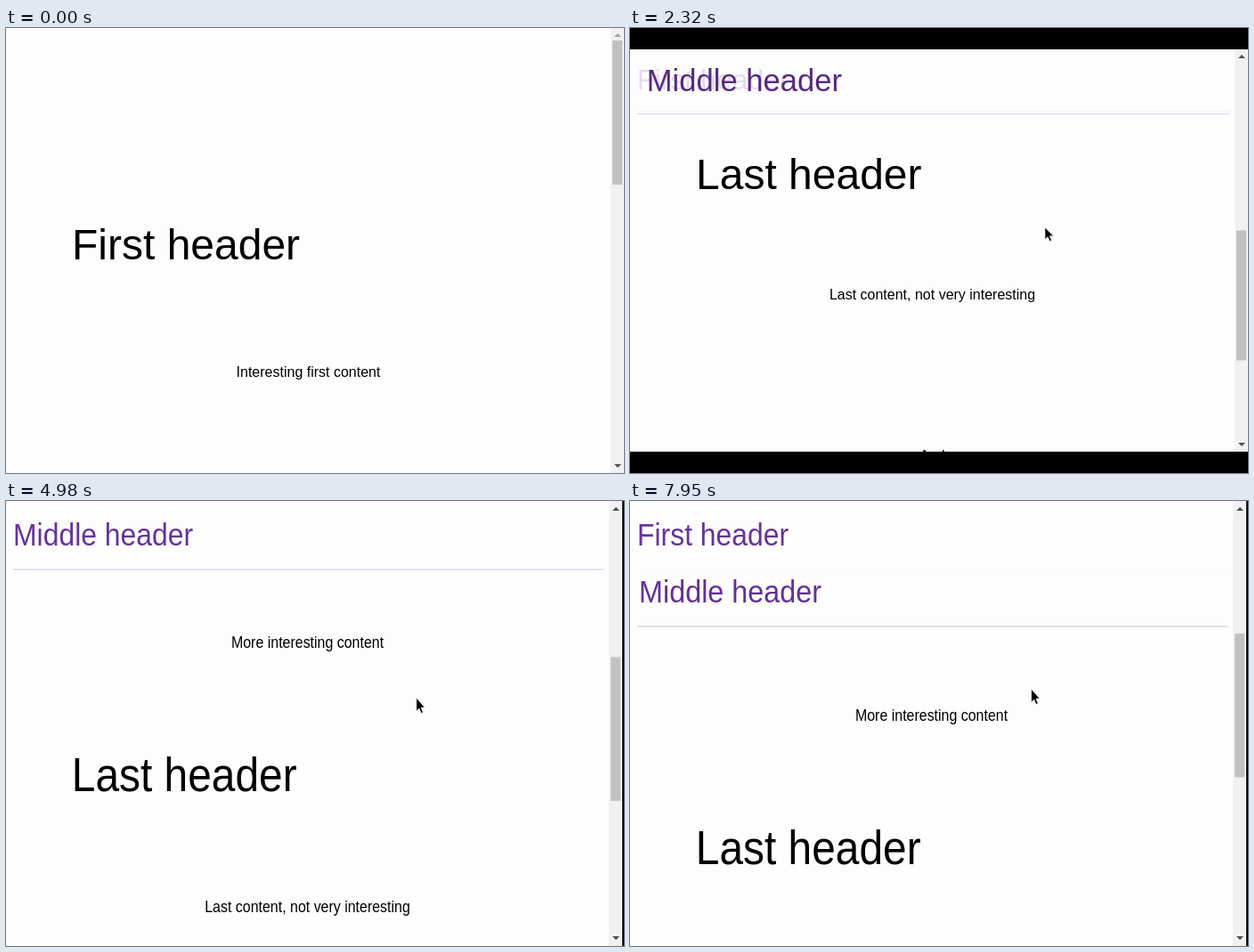
An HTML page that plays this animation: 694 by 500 pixels, repeating every 7990 ms.

```html
<!DOCTYPE html>
<html lang="en">
<head>
<meta charset="utf-8">
<title>Sticky headers</title>
<style>
  html, body { margin: 0; width: 100%; height: 100%; overflow: hidden; background: #000; }
  #page {
    position: absolute; left: 0; width: 694px; overflow: hidden;
    transform-origin: 0 0; background: #fdfdfd; color: #000;
    font-family: "Liberation Sans", Arial, sans-serif;
  }
  #page > * { position: absolute; top: 0; left: 0; white-space: nowrap; }
  #page > .head {
    left: 8px; width: 665px; box-sizing: border-box;
    padding: 16px 0; border-bottom: 1px solid; line-height: 1.149;
  }
  #page > .text { width: 679px; text-align: center; font-size: 16px; line-height: 18.4px; }
  #page > #track { left: 679px; width: 15px; height: 100%; background: #f1f1f1; }
  #page > #thumb { left: 681px; width: 11px; background: #c1c1c1; }
  #page > .arrow { left: 682.5px; border: solid transparent; border-width: 0 4px; }
  #page > #up { top: 6px; border-bottom: 4px solid; }
  #page > #down { top: auto; bottom: 6px; border-top: 4px solid; }
</style>
</head>
<body>
<div id="page"></div>
<script>
const LOOP = 7990, FADE = 700, EM = 1.149, BUTTON = 14;
const page = document.getElementById('page');

// Page flow; gap is the space above, in units of 18% of the window height.
// Headers list the times when they become stuck (+) or loose (-).
const flow = [
  { head: 'First header', gap: 20 / 9, flips: [1362] },
  { text: 'Interesting first content', gap: 1 },
  { head: 'Middle header', gap: 1, flips: [1800, -5080, 6505, -7878] },
  { text: 'More interesting content', gap: 1 },
  { head: 'Last header', gap: 1, flips: [2585, -4158] },
  { text: 'Last content, not very interesting', gap: 1 },
  { text: 'And', gap: 2 },
  { text: 'this...', gap: 2 }
];

// Eased moves: start time, end time, value reached.
const scrolling = [
  [1150, 1970, 480], [1970, 2740, 730], [2770, 3000, 854], [3440, 4980, 448],
  [5080, 5700, 311], [6010, 7200, 556], [7490, 8000, 369]
];
const pointerX = [[500, 900, 466], [3440, 7950, 452]];
const pointerY = [[500, 900, 200], [5080, 5700, 191]];

function smooth(x) {
  x = Math.min(1, Math.max(0, x));
  return x * x * (3 - 2 * x);
}

const glide = (from, moves, t) =>
  moves.reduce((v, [start, end, to]) => v + (to - v) * smooth((t - start) / (end - start)), from);

const stuckness = (flips, t) =>
  flips.reduce((p, f) => p + Math.sign(f) * smooth((t - Math.abs(f)) / FADE), 0);

const move = (el, x, y) => el.style.transform = `translate(${x}px, ${y}px)`;

function add(cls, text, id) {
  const el = document.createElement('div');
  if (cls) el.className = cls;
  if (id) el.id = id;
  el.textContent = text || '';
  return page.appendChild(el);
}

// Paragraphs lie below the headers.
flow.filter(f => f.text).forEach(f => f.el = add('text', f.text));
flow.filter(f => f.head).forEach(f => f.el = add('head', f.head));
add('', '', 'track');
const thumb = add('', '', 'thumb');
const up = add('arrow', '', 'up');
const down = add('arrow', '', 'down');
page.insertAdjacentHTML('beforeend',
  '<svg id="pointer" width="14" height="19" style="overflow:visible">' +
  '<path d="M0 0V13.5L3.1 10.7L5.3 15.6L7.5 14.6L5.3 9.8H9.5Z" stroke="#fff" stroke-width=".6"/></svg>');
const pointer = document.getElementById('pointer');

// Full window, then letterboxed, then stretched to the stage.
function setView(t) {
  const full = t < 120, stretched = t >= 3160;
  const height = full ? 500 : 452;
  page.style.height = height + 'px';
  page.style.top = full || stretched ? '0' : '24px';
  page.style.transform = stretched ? `scale(${692 / 694}, ${500 / 452})` : 'none';
  pointer.style.display = full ? 'none' : 'block';
  return height;
}

function layOut(t, unit) {
  let y = 0;
  for (const f of flow) {
    y += f.gap * unit;
    f.top = y;
    if (f.head) {
      f.p = stuckness(f.flips, t);
      f.size = 48 - 16 * f.p;
      y += 33 + f.size * EM;
    } else {
      y += 16 * EM;
    }
  }
  return y + unit;
}

function drawHead({ el, top, p, size }, scroll) {
  move(el, 0, Math.max(top - scroll, 0));
  const s = el.style;
  s.fontSize = size + 'px';
  s.textIndent = 66 * (1 - p) + 'px';
  s.color = `rgb(${102 * p}, ${51 * p}, ${153 * p})`;
  s.backgroundColor = `rgba(253, 253, 253, ${p})`;
  s.borderColor = `rgba(206, 206, 234, ${p})`;
}

function draw(t) {
  const height = setView(t);
  const total = layOut(t, height * 0.18);
  const end = total - height;
  const scroll = Math.min(glide(0, scrolling, t), end);

  for (const f of flow) {
    if (f.head) drawHead(f, scroll);
    else move(f.el, 0, f.top - scroll);
  }

  const room = height - 2 * BUTTON;
  thumb.style.height = room * height / total + 'px';
  move(thumb, 0, BUTTON + room * scroll / total);
  up.style.borderBottomColor = scroll < 1 ? '#a3a3a3' : '#505050';
  down.style.borderTopColor = scroll > end - 1 ? '#a3a3a3' : '#505050';
  move(pointer, glide(655, pointerX, t), glide(397, pointerY, t));
}

const start = performance.now();
function tick() {
  draw((performance.now() - start) % LOOP);
  requestAnimationFrame(tick);
}
tick();
</script>
</body>
</html>
```
